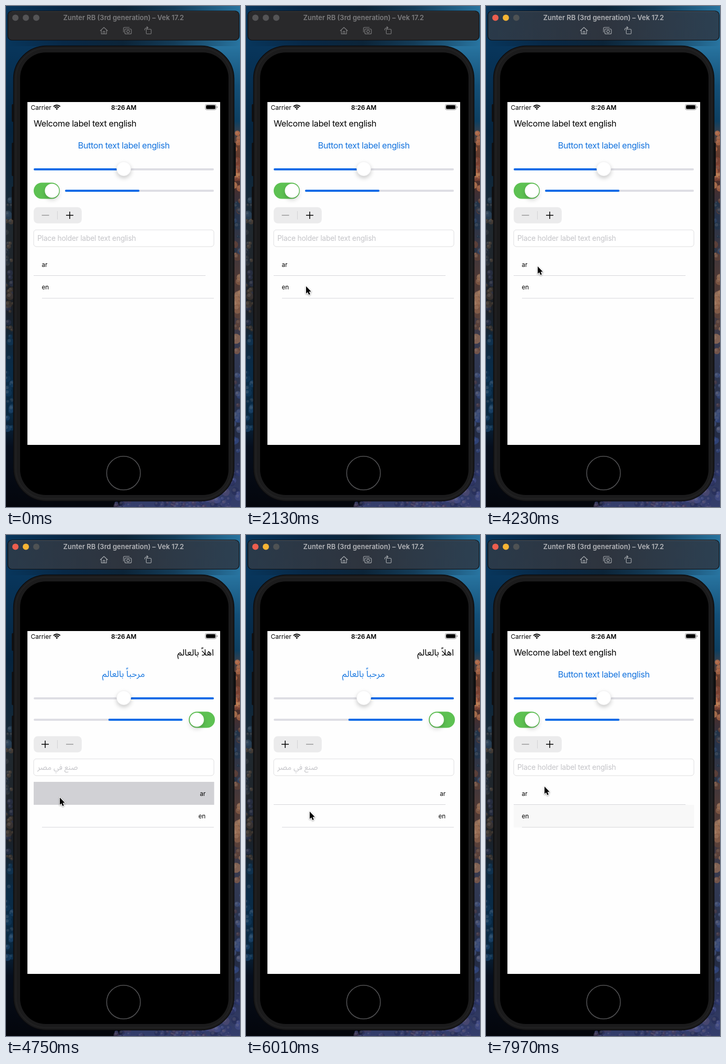
Animation of 448 by 960 pixels, one loop 7.99 s. Source, as an HTML page with a canvas:

```html
<!DOCTYPE html>
<html lang="en">
<head>
<meta charset="utf-8">
<title>Language switch</title>
<style>
  html, body { margin: 0; width: 100%; height: 100%; overflow: hidden; background: #000; }
  canvas { display: block; width: 100vw; height: 100vh; }
</style>
</head>
<body>
<canvas id="stage" width="448" height="960"></canvas>
<script>
const W = 448, H = 960, LOOP = 7990;
const ctx = document.getElementById('stage').getContext('2d');
const SANS = 'Inter, Roboto, sans-serif';
const ARABIC = '"Noto Sans Arabic", "DejaVu Sans", sans-serif';
const BLUE = '#0a6ae6', TRACK = '#dedee4', PAPER = '#fefefe', RULE = '#d6d6da';

// Moments of the interaction, in ms
const ACTIVE_AT = 3000;
const AR_AT = 4600, EN_AT = 7120;
const CURSOR = [
  [1150, 300, 640], [1900, 115, 537], [2600, 115, 537], [3050, 99, 499],
  [4350, 99, 499], [4700, 103, 503], [5350, 103, 503], [5900, 122, 530],
  [7420, 122, 530], [7940, 112, 482]
];

function seeded(seed) {
  return () => (seed = (seed * 16807) % 2147483647) / 2147483647;
}

function roundRect(c, x, y, w, h, r, fill, stroke, lw = 1) {
  c.beginPath();
  c.roundRect(x, y, w, h, r);
  if (fill) { c.fillStyle = fill; c.fill(); }
  if (stroke) { c.strokeStyle = stroke; c.lineWidth = lw; c.stroke(); }
}

function disc(c, x, y, r, fill) {
  c.beginPath();
  c.arc(x, y, r, 0, Math.PI * 2);
  c.fillStyle = fill;
  c.fill();
}

function line(c, x1, y1, x2, y2, color, lw = 1, cap = 'butt') {
  c.beginPath();
  c.moveTo(x1, y1);
  c.lineTo(x2, y2);
  c.strokeStyle = color;
  c.lineWidth = lw;
  c.lineCap = cap;
  c.stroke();
}

function text(c, str, x, y, size, color, o = {}) {
  c.font = `${o.weight || 400} ${size}px ${o.font || SANS}`;
  c.textAlign = o.align || 'left';
  c.textBaseline = 'alphabetic';
  c.direction = o.rtl ? 'rtl' : 'ltr';
  c.letterSpacing = (o.spacing || 0) + 'px';
  c.fillStyle = color;
  c.fillText(str, x, y);
}

function gradient(c, x1, y1, x2, y2, stops) {
  const g = c.createLinearGradient(x1, y1, x2, y2);
  for (const [at, color] of stops) g.addColorStop(at, color);
  return g;
}

function blobs(c, rnd, count, [x, y, w, h], size, colors) {
  for (let i = 0; i < count; i++) {
    const bx = x + rnd() * w, by = y + rnd() * h, r = size * (0.5 + rnd());
    c.globalAlpha = 0.7;
    disc(c, bx, by, r, colors[Math.floor(rnd() * colors.length)]);
    c.globalAlpha = 0.12;
    disc(c, bx - r * 0.3, by - r * 0.3, r * 0.45, '#e0d0c0');
  }
  c.globalAlpha = 1;
}

function drawReef(c) {
  c.fillStyle = gradient(c, 0, 0, 0, H, [
    [0, '#08365c'], [0.08, '#08365c'], [0.25, '#06243e'], [0.36, '#12283a'],
    [0.45, '#20282e'], [0.6, '#1c2026'], [0.72, '#0a2c48'], [0.82, '#0a2840'],
    [0.88, '#060e1c'], [1, '#04060c']
  ]);
  c.fillRect(0, 0, 224, H);
  c.fillStyle = gradient(c, 0, 0, 0, H, [
    [0, '#2874a0'], [0.08, '#2874a0'], [0.16, '#145078'], [0.23, '#0e4062'],
    [0.28, '#6a4030'], [0.36, '#482e2c'], [0.42, '#26344c'], [0.55, '#523a34'],
    [0.7, '#323a54'], [0.85, '#242c44'], [1, '#343e6c']
  ]);
  c.fillRect(224, 0, 224, H);
  c.fillStyle = gradient(c, 0, 0, W, 0, [
    [0, '#08365c'], [0.25, '#082846'], [0.5, '#0c2438'], [0.72, '#143c58'], [1, '#2874a0']
  ]);
  c.fillRect(0, 0, W, 77);

  const rnd = seeded(7213);
  blobs(c, rnd, 20, [0, 365, 13, 130], 5, ['#343a42', '#2a4258', '#4c4038', '#222e3a']);
  blobs(c, rnd, 18, [0, 500, 13, 130], 5, ['#2a3048', '#40362e', '#1c2838']);
  blobs(c, rnd, 20, [0, 630, 13, 190], 5, ['#103858', '#1a4268', '#0c2c48']);
  blobs(c, rnd, 14, [436, 242, 14, 120], 6, ['#b86c48', '#884838', '#c88458']);
  blobs(c, rnd, 16, [436, 365, 14, 110], 5, ['#2c4468', '#20344c', '#6a4438']);
  blobs(c, rnd, 18, [436, 470, 14, 200], 7, ['#8c6048', '#644438', '#a07458']);
  blobs(c, rnd, 24, [434, 670, 16, 190], 5, ['#32467c', '#44547c', '#4c3c48']);
  blobs(c, rnd, 85, [345, 875, 103, 90], 5, ['#2e386c', '#424c88', '#262e58', '#504c74']);
  blobs(c, rnd, 60, [210, 948, 170, 18], 4, ['#262e58', '#3a4274', '#443c60']);
}

function drawPhone(c) {
  for (const [y, h] of [[188, 34], [262, 64], [346, 64]]) roundRect(c, 11, y, 5, h, 2, '#101012');
  roundRect(c, 435, 262, 5, 64, 2, '#101012');
  roundRect(c, 14.5, 76.5, 422, 872, 63, '#1b1b1c', '#0c0c0e', 1.5);
  roundRect(c, 19, 81, 413, 863, 58, null, '#232324', 1.5);
  roundRect(c, 27, 89, 399, 848, 49, '#000');
  c.beginPath();
  c.arc(225, 895, 32.3, 0, Math.PI * 2);
  c.strokeStyle = '#505052';
  c.lineWidth = 1.6;
  c.stroke();
}

function drawToolbarIcons(c, color) {
  c.strokeStyle = color;
  c.lineWidth = 1.1;
  c.lineCap = c.lineJoin = 'round';
  c.beginPath();
  c.moveTo(180.5, 47.5); c.lineTo(187.5, 41); c.lineTo(194.5, 47.5);
  c.moveTo(182.5, 46); c.lineTo(182.5, 53.5); c.lineTo(192.5, 53.5); c.lineTo(192.5, 46);
  c.moveTo(186, 53); c.lineTo(186, 48.5); c.lineTo(189, 48.5); c.lineTo(189, 53);
  c.stroke();
  roundRect(c, 227.5, 44, 12.5, 9.5, 2, null, color, 1.1);
  c.beginPath();
  c.moveTo(225, 50); c.lineTo(225, 42.5);
  c.quadraticCurveTo(225, 41, 226.5, 41); c.lineTo(236, 41);
  c.moveTo(236.4, 48.8); c.arc(233.8, 48.8, 2.6, 0, Math.PI * 2);
  c.stroke();
  roundRect(c, 268.5, 44.5, 9.5, 9, 1.5, null, color, 1.1);
  c.beginPath();
  c.moveTo(265.5, 46); c.quadraticCurveTo(265.5, 41.5, 272, 41.5);
  c.moveTo(269.5, 39.5); c.lineTo(272, 41.5); c.lineTo(269.5, 43.5);
  c.stroke();
}

function drawTitleBar(c, active) {
  const fill = active
    ? gradient(c, 4, 0, 446, 0, [[0, '#2a3a4a'], [0.5, '#2e343e'], [1, '#2c4052']])
    : '#29292b';
  roundRect(c, 3.5, 9.5, 443, 56, 8, fill, '#0e1014', 1.2);
  line(c, 11, 10.5, 439, 10.5, active ? '#4a5662' : '#3c3c3e');
  const lights = active ? ['#ec5e4e', '#f6b434', '#4e5254'] : ['#545456', '#545456', '#545456'];
  lights.forEach((color, i) => disc(c, 18 + i * 20, 22.5, 6, color));
  text(c, 'Zunter RB (3rd generation) – Vek 17.2', 225, 27, 13, active ? '#b2b4b8' : '#7c7c7e',
    { weight: 600, align: 'center' });
  drawToolbarIcons(c, active ? '#aaaeb2' : '#808082');
}

function drawStatusBar(c) {
  text(c, 'Carrier', 47.5, 198.5, 12, '#000');
  c.strokeStyle = '#000';
  c.lineCap = 'butt';
  c.lineWidth = 2.1;
  for (const r of [5.2, 8.6]) {
    c.beginPath();
    c.arc(97.3, 198.6, r, -Math.PI * 0.76, -Math.PI * 0.24);
    c.stroke();
  }
  c.beginPath();
  c.moveTo(97.3, 199.2);
  c.arc(97.3, 198.6, 2.7, -Math.PI * 0.77, -Math.PI * 0.23);
  c.closePath();
  c.fillStyle = '#000';
  c.fill();
  text(c, '8:26\u2009AM', 225.5, 198.5, 12, '#000', { weight: 600, align: 'center' });
  roundRect(c, 381.5, 188.5, 21, 10.5, 3, null, '#949496');
  roundRect(c, 383, 190, 18, 7.5, 1.8, '#000');
  roundRect(c, 403.5, 192, 1.5, 3.5, 0.7, '#949496');
}

function paintLayer(draw) {
  const layer = document.createElement('canvas');
  layer.width = W;
  layer.height = H;
  draw(layer.getContext('2d'));
  return layer;
}

const frames = [false, true].map(active => paintLayer(c => {
  drawReef(c);
  drawPhone(c);
  drawTitleBar(c, active);
  c.fillStyle = PAPER;
  c.fillRect(41, 184, 369, 657);
  drawStatusBar(c);
}));

function drawLabels(rtl) {
  if (rtl) {
    const arabic = { font: ARABIC, rtl: true };
    text(ctx, 'اهلاً بالعالم', 398, 231, 17, '#000', { ...arabic, align: 'right' });
    text(ctx, 'مرحباً بالعالم', 225, 272, 17, '#1a78e0', { ...arabic, align: 'center' });
    text(ctx, 'صنع في مصر', 60, 450, 14.5, '#c4c4c8', { ...arabic, align: 'left' });
  } else {
    text(ctx, 'Welcome label text english', 53, 231, 16.3, '#000', { spacing: -0.35 });
    text(ctx, 'Button text label english', 225.5, 272.5, 16.3, '#1272de',
      { align: 'center', spacing: -0.35 });
    text(ctx, 'Place holder label text english', 60, 450, 13.8, '#c4c4c8', { spacing: -0.2 });
  }
}

function knob(x, y, r, shadow) {
  ctx.save();
  ctx.shadowColor = shadow;
  ctx.shadowBlur = 8;
  ctx.shadowOffsetY = 4;
  disc(ctx, x, y, r, '#fff');
  ctx.restore();
}

function bar(x1, x2, y, color) {
  line(ctx, x1 + 2, y, x2 - 2, y, color, 4, 'round');
}

function drawControls(rtl) {
  bar(53, 398, 313, TRACK);
  bar(rtl ? 225 : 53, rtl ? 398 : 225, 313, BLUE);
  knob(225.5, 312, 13.6, 'rgba(0,0,0,.22)');
  ctx.beginPath();
  ctx.arc(225.5, 312, 13.6, 0, Math.PI * 2);
  ctx.strokeStyle = '#ececee';
  ctx.lineWidth = 0.7;
  ctx.stroke();

  const sw = rtl ? 350 : 53;
  roundRect(ctx, sw, 338.5, 50, 31, 15.5, '#5dc152');
  knob(sw + (rtl ? 15.3 : 35), 354, 13.6, 'rgba(0,0,0,.18)');

  const px = rtl ? 53 : 113;
  bar(px, px + 285, 354, TRACK);
  bar(rtl ? 196 : px, rtl ? 338 : 255.5, 354, BLUE);

  roundRect(ctx, 53, 385.5, 92, 31, 8, '#ebebec');
  line(ctx, 98.5, 393, 98.5, 409, '#d2d2d5');
  const plus = rtl ? 75 : 122, minus = rtl ? 122 : 75.5;
  line(ctx, minus - 7, 401, minus + 7, 401, '#98989a', 1.5);
  line(ctx, plus - 7, 401, plus + 7, 401, '#000', 1.5);
  line(ctx, plus, 394, plus, 408, '#000', 1.5);

  roundRect(ctx, 53, 429, 345, 32, 5, '#fff', '#dedee0', 1);
}

// Held highlight that then fades back to the page
function highlight(t, start, hold, fade) {
  if (t < start) return 0;
  return Math.min(1, Math.max(0, 1 - (t - start - hold) / fade));
}

function fillRow(y, h, alpha) {
  ctx.fillStyle = `rgba(209,209,213,${alpha})`;
  ctx.fillRect(53, y, 345.5, h);
}

function drawTable(t, rtl) {
  const ar = highlight(t, AR_AT, 300, 540);
  const en = highlight(t, EN_AT, 200, 760);
  if (!ar) line(ctx, 53, 516.5, 382, 516.5, RULE);
  line(ctx, 69, 560, 398, 560, RULE);
  fillRow(473, 44, ar);
  fillRow(517, 43.5, en);
  const x = rtl ? 382 : 68.5, align = rtl ? 'right' : 'left';
  text(ctx, 'ar', x, 500, 11.5, '#000', { align });
  text(ctx, 'en', x, 543, 11.5, '#000', { align });
}

function drawCursor(t) {
  if (t < CURSOR[0][0]) return;
  let [, x, y] = CURSOR[CURSOR.length - 1];
  const i = CURSOR.findIndex(k => k[0] > t);
  if (i > 0) {
    const [t0, x0, y0] = CURSOR[i - 1], [t1, x1, y1] = CURSOR[i];
    const p = (t - t0) / (t1 - t0), e = p * p * (3 - 2 * p);
    x = x0 + (x1 - x0) * e;
    y = y0 + (y1 - y0) * e;
  }
  const pts = [[0, 0], [0, 14], [3.1, 11.2], [5.4, 16.3], [7.8, 15.2], [5.6, 10.2], [9.8, 10.2]];
  ctx.save();
  ctx.translate(x, y);
  ctx.beginPath();
  pts.forEach(p => ctx.lineTo(...p));
  ctx.closePath();
  ctx.lineJoin = 'round';
  ctx.strokeStyle = '#fff';
  ctx.lineWidth = 2;
  ctx.shadowColor = 'rgba(0,0,0,.4)';
  ctx.shadowBlur = 3;
  ctx.shadowOffsetY = 1;
  ctx.stroke();
  ctx.shadowColor = 'transparent';
  ctx.fillStyle = '#000';
  ctx.fill();
  ctx.restore();
}

function render(t) {
  const rtl = t >= AR_AT + 40 && t < EN_AT + 40;
  ctx.drawImage(frames[t >= ACTIVE_AT ? 1 : 0], 0, 0);
  drawControls(rtl);
  drawLabels(rtl);
  drawTable(t, rtl);
  drawCursor(t);
}

const begin = performance.now();
function tick() {
  render((performance.now() - begin) % LOOP);
  requestAnimationFrame(tick);
}
tick();
</script>
</body>
</html>
```
